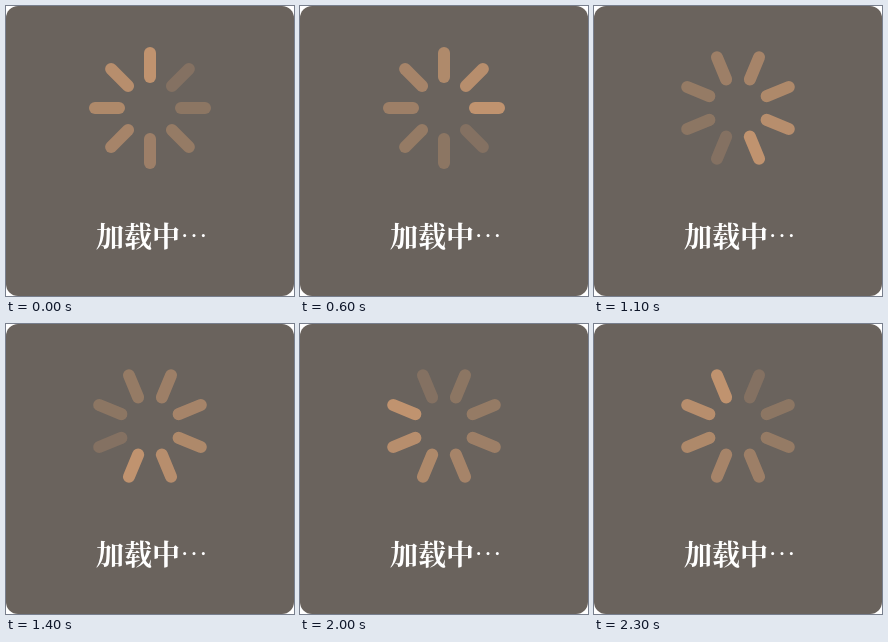
These frames come from a looping animation (288x290 px, 2400 ms). An HTML page with a canvas:

```html
<!DOCTYPE html>
<html lang="zh-CN">
<head>
<meta charset="utf-8">
<title>加载中</title>
<style>
  html, body { margin: 0; width: 100%; height: 100%; overflow: hidden; background: #fff; }
  .panel { position: relative; width: 288px; height: 290px; border-radius: 12px; background: #6a635d; overflow: hidden; }
  canvas { position: absolute; left: 0; top: 0; }
  p {
    position: absolute; left: 90px; top: 209px; margin: 0;
    font: 700 28px/40px "Noto Serif CJK SC", "Noto Sans CJK SC", "Noto Sans CJK", serif;
    color: #fff; white-space: nowrap;
  }
  span { font-weight: 400; }
</style>
</head>
<body>
<div class="panel">
  <canvas width="288" height="290"></canvas>
  <p>加载中<span>⋯</span></p>
</div>
<script>
const ctx = document.querySelector('canvas').getContext('2d');
const CENTER = { x: 144, y: 102 };
const BARS = 8;
const STEP = Math.PI * 2 / BARS;
const BEAT = 300;
const HALF_STEP_AT = 200;
const LOOP = BARS * BEAT;

// Each beat holds, then turns in two hard half steps.
function angleAt(time) {
  const t = time % LOOP;
  const half = t % BEAT >= HALF_STEP_AT ? 0.5 : 0;
  return (Math.floor(t / BEAT) + half) * STEP;
}

function draw(time) {
  ctx.clearRect(0, 0, 288, 290);
  ctx.save();
  ctx.translate(CENTER.x, CENTER.y);
  ctx.rotate(angleAt(time));
  ctx.lineWidth = 12;
  ctx.lineCap = 'round';
  ctx.strokeStyle = '#c0936f';
  for (let i = 0; i < BARS; i++) {
    ctx.globalAlpha = 1 - i * 0.1;
    ctx.beginPath();
    ctx.moveTo(0, -31);
    ctx.lineTo(0, -55);
    ctx.stroke();
    ctx.rotate(-STEP);
  }
  ctx.restore();
}

const start = performance.now();
function frame() {
  draw(performance.now() - start);
  requestAnimationFrame(frame);
}
draw(0);
requestAnimationFrame(frame);
</script>
</body>
</html>
```
